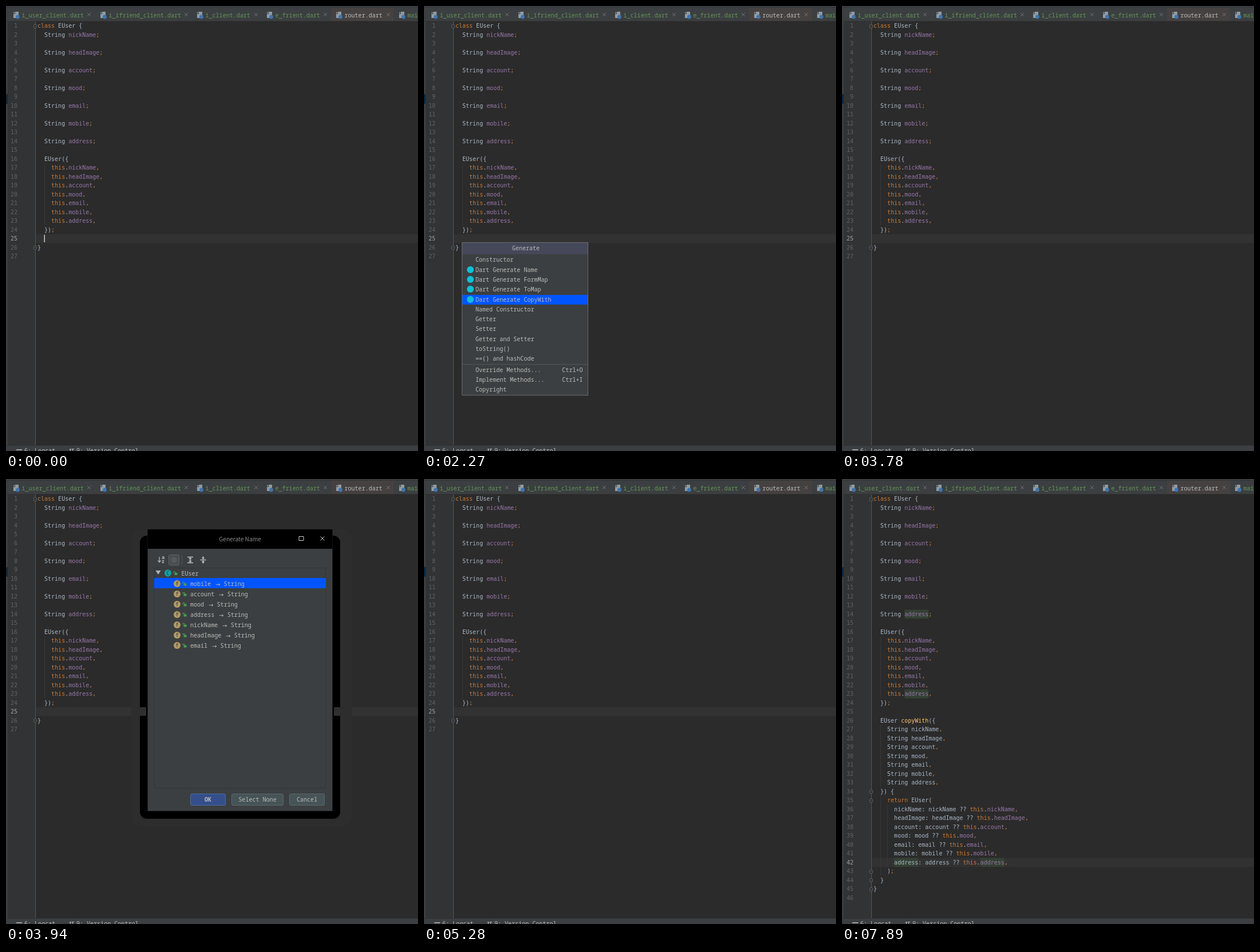
Recreate the animation shown at these times as an HTML page with a canvas. Size 720 by 778 pixels, loop 8200 ms.

```html
<!DOCTYPE html>
<html lang="en">
<head>
<meta charset="utf-8">
<title>Generate copyWith</title>
<style>
html, body { margin: 0; width: 100%; height: 100%; overflow: hidden; background: #2b2b2b; }
canvas { display: block; }
</style>
</head>
<body>
<canvas id="stage" width="720" height="778"></canvas>
<script>
const ctx = document.getElementById('stage').getContext('2d');
const LOOP = 8200, ROW = 15.5, CHAR = 6.02, LEFT = 55;
const TEXT = '#a9b7c6', ORANGE = '#cc7832', PURPLE = '#9876aa', YELLOW = '#ffc66d';
const PANEL = '#3c3f41', UI = '#bbbbbb', BLUE = '#0055ff';
const CODE_FONT = '10px "DejaVu Sans Mono", monospace';
const UI_FONT = '10.05px "Noto Sans Mono", monospace';

const fields = ['nickName', 'headImage', 'account', 'mood', 'email', 'mobile', 'address'];
const head = [
  'class EUser {',
  ...fields.flatMap(f => [`  String ${f};`, '']),
  '  EUser({',
  ...fields.map(f => `    this.${f},`),
  '  });', ''
];
const before = [...head, '}', ''];
const after = [
  ...head,
  '  EUser copyWith({',
  ...fields.map(f => `    String ${f},`),
  '  }) {',
  '    return EUser(',
  ...fields.map(f => `      ${f}: ${f} ?? this.${f},`),
  '    );', '  }', '}', ''
];

const menu = ['Constructor', 'Dart Generate Name', 'Dart Generate FormMap', 'Dart Generate ToMap',
  'Dart Generate CopyWith', 'Named Constructor', 'Getter', 'Setter', 'Getter and Setter',
  'toString()', '==() and hashCode', 'Override Methods...', 'Implement Methods...', 'Copyright'];
const shortcuts = { 11: 'Ctrl+O', 12: 'Ctrl+I' };
const members = ['mobile', 'account', 'mood', 'address', 'nickName', 'headImage', 'email'];
const tabs = [[12, 'i_user_client.dart', 145], [164, 'i_ifriend_client.dart', 315],
  [333, 'i_client.dart', 437], [455, 'e_frient.dart', 558], [576, 'router.dart', 668], [686, 'main.dart']];

function rect(x, y, w, h, color) {
  ctx.fillStyle = color;
  ctx.fillRect(x, y, w, h);
}

function round(x, y, w, h, r, fill, stroke) {
  ctx.beginPath();
  ctx.roundRect(x, y, w, h, r);
  if (fill) { ctx.fillStyle = fill; ctx.fill(); }
  if (stroke) { ctx.strokeStyle = stroke; ctx.lineWidth = 1; ctx.stroke(); }
}

function text(str, x, y, color = UI, font = UI_FONT, align = 'left') {
  ctx.font = font;
  ctx.fillStyle = color;
  ctx.textAlign = align;
  ctx.fillText(str, x, y);
}

function disc(x, y, r, color) {
  ctx.beginPath();
  ctx.arc(x, y, r, 0, 7);
  ctx.fillStyle = color;
  ctx.fill();
}

function path(d, color, width = 1, fill = false) {
  const p = new Path2D(d);
  ctx.strokeStyle = ctx.fillStyle = color;
  ctx.lineWidth = width;
  if (fill) ctx.fill(p); else ctx.stroke(p);
}

const cross = (x, y, r, color) =>
  path(`M${x - r} ${y - r}l${2 * r} ${2 * r}M${x + r} ${y - r}l${-2 * r} ${2 * r}`, color);
const lineTop = n => 27 + ROW * (n - 1);

function drawChrome() {
  rect(0, 0, 720, 27, PANEL);
  rect(0, 2, 720, 1, '#323537');
  rect(568, 3, 110, 23, '#464141');
  rect(0, 26, 720, 1, '#323232');
  rect(0, 27, 3, 741, PANEL);
  rect(0, 154, 3, 17, '#0d293e');
  for (const [x, name, closeX] of tabs) {
    path(`M${x + 4} 10h6v11h-9v-7h3z`, '#8f9ba3', 1, true);
    path(`M${x + 1} 13v-1l2-2v3z`, '#8f9ba3', 1, true);
    disc(x + 8.5, 19, 3.4, '#3f74b0');
    text(name, x + 15.5, 19.5, name === 'router.dart' ? UI : '#629755');
    if (closeX) cross(closeX, 15, 3, '#6e7173');
  }
  rect(0, 768, 720, 10, PANEL);
  rect(0, 768, 720, 1, '#323537');
  rect(18, 775, 10, 1.5, UI);
  text('6: Logcat', 32, 781);
  path('M112.5 778v-4M110.5 776l2-2 2 2M116.5 774v4M115 774.5h4', UI);
  text('9: Version Control', 123, 781);
}

function foldMark(n) {
  const y = Math.round(lineTop(n) + 4.5) + .5;
  round(48.5, y, 5, 6, 1, '#2b2b2b', '#606366');
  rect(50, y + 2.5, 2, 1, '#606366');
}

function guide(col, first, last) {
  rect(Math.round(LEFT + col * CHAR), lineTop(first), 1, (last - first + 1) * ROW, '#373737');
}

function drawLine(line, n, semantic) {
  const y = Math.round(lineTop(n) + 11.3);
  const token = /(class|return|this|[,;])|((?<=this\.|^  String )\w+)|(copyWith)|[^\s,;.]+|\./g;
  for (const m of line.matchAll(token)) {
    const known = semantic || n < 26;
    const color = m[1] ? ORANGE : known && m[2] ? PURPLE : known && m[3] ? YELLOW : TEXT;
    text(m[0], LEFT + m.index * CHAR, y, color, CODE_FONT);
  }
}

function drawEditor(t) {
  const inserted = t >= 5330;
  const lines = inserted ? after : before;
  const current = t >= 6210 ? 42 : 25;
  rect(3, 27, 49, 741, '#313335');
  rect(52, lineTop(current), 668, ROW, '#323232');
  rect(51, 27, 1, 741, '#555555');

  if (t >= 6260) {
    for (const [n, col] of [[14, 9], [23, 9], [42, 6], [42, 31]])
      rect(LEFT + col * CHAR, lineTop(n), 7 * CHAR, ROW, '#344134');
  }
  guide(2, 17, 23);
  if (inserted) {
    guide(2, 27, 33);
    guide(2, 35, 43);
    guide(4, 36, 42);
  }
  lines.forEach((line, i) => {
    const n = i + 1;
    text(n, 20, Math.round(lineTop(n) + 11.3), n === current ? '#a4a3a3' : '#606366', CODE_FONT, 'right');
    drawLine(line, n, t >= 5900);
  });
  [1, lines.length - 1, ...(t >= 5620 ? [34, 35, 43, 44] : [])].forEach(foldMark);

  if (t < 50 || t >= 540 && t < 1470) rect(66.5, 400, 1.5, 13, '#cccccc');
  if (t >= 6210 && t < 6910 || t >= 7390 && t < 7890) rect(90.5, 663, 1.5, 14, '#cccccc');
}

// Brief ring around the pointer.
function drawRipple(t) {
  const p = (t - 740) / 290;
  if (p < 0 || p >= 1) return;
  ctx.beginPath();
  ctx.arc(125, 412, 3 + 7 * p, 0, 7);
  ctx.strokeStyle = `rgba(187,187,187,${.5 * (1 - p)})`;
  ctx.lineWidth = 1;
  ctx.stroke();
}

function drawMenu(selected) {
  round(66.5, 413.5, 220, 267, 0, PANEL, '#6a6d70');
  rect(67, 414, 219, 20, '#454859');
  text('Generate', 178, 427, UI, UI_FONT, 'center');
  rect(67, 626, 219, 1, '#54575a');
  menu.forEach((label, i) => {
    const top = Math.round(435.3 + 17.3 * i + (i > 10 ? 2 : 0));
    if (i === selected) rect(67, top, 219, 17, BLUE);
    if (i > 0 && i < 5) disc(81, top + 8, 6, '#12bfd6');
    text(label, 90, top + 11.5);
    if (shortcuts[i]) text(shortcuts[i], 277.5, top + 12, UI, UI_FONT, 'right');
  });
}

function badge(x, y, letter, color) {
  disc(x, y, 6, color);
  text(letter, x, y + 3, '#2f3436', '9px "DejaVu Sans Mono", monospace', 'center');
  const lockX = x + 10;
  path(`M${lockX} ${y}v-2.5h3v2.5`, '#499c54');
  rect(lockX + 1.5, y - .5, 5, 4, '#499c54');
}

function button(x, w, label, fill, stroke, font = UI_FONT) {
  round(x + .5, 550.5, w - 1, 20, 2, fill, stroke);
  text(label, x + w / 2, 563.5, UI, font, 'center');
}

function drawDialog(t) {
  round(219, 88, 386, 520, 20, '#2d2d2d');
  round(234, 99, 350, 495, 12, '#000');
  rect(234, 399, 11, 15, '#2f2f2f');
  rect(573, 399, 11, 15, '#2f2f2f');
  rect(247.5, 88, 323, 492.5, PANEL);
  rect(247.5, 88, 323, 34, '#000');
  text('Generate Name', 409, 109, '#8c8c8c', '10.2px "Noto Sans CJK SC", "Noto Sans", sans-serif', 'center');
  path('M512 100.5h8v7h-8z', '#d0d0d0');
  cross(553, 104, 3.5, '#d0d0d0');
  if (t < 3940) return;

  path('M268 136v9M265.5 142.5l2.5 3 2.5-3', '#afb1b3', 1.3);
  text('a', 272, 140, '#afb1b3', 'bold 8px "DejaVu Sans", sans-serif');
  text('z', 272, 147, '#afb1b3', 'bold 8px "DejaVu Sans", sans-serif');
  round(284.5, 132.5, 18, 18, 2, '#4a4d4f', '#606365');
  disc(293.5, 141.5, 5, '#525b63');
  rect(307, 133, 1, 17, '#555759');
  path('M317 136.5h10M317 146.5h10M322 138v7M320 140l2-2 2 2M320 143l2 2 2-2', '#c0c2c4', 1.3);
  path('M339.5 141.5h10M344.5 135v4M342.5 137.5l2 2 2-2M344.5 148v-4M342.5 145.5l2-2 2 2', '#c0c2c4', 1.3);

  round(259.5, 155.5, 299, 385, 0, PANEL, '#323537');
  if (t >= 4910) rect(259, 155, 300, 145, BLUE);
  else rect(259, 173, 300, 18, BLUE);
  path('M261.5 160h9l-4.5 7z', '#b0b2b4', 1, true);
  badge(283, 164.5, 'C', '#0fa3a5');
  text('EUser', 306.5, 168.5);
  members.forEach((name, i) => {
    const y = 183 + 18 * i;
    const nameEnd = 322 + name.length * CHAR;
    badge(299, y, 'f', '#b29a63');
    text(name, 322, y + 3.5);
    text('→', nameEnd + 12, y + 4.5, UI, '10px "DejaVu Sans", sans-serif', 'center');
    text('String', nameEnd + 22.5, y + 3.5);
  });

  button(322, 62, 'OK', '#344f8b', '#4b6da0', 'bold ' + UI_FONT);
  button(394, 91, 'Select None', '#465457', '#5b686b');
  button(495, 62, 'Cancel', '#465457', '#5b686b');
}

// Start time and selected entry of each menu step.
const menuSteps = [[1520, 0], [1920, 1], [2170, 2], [2270, 4], [2780, 3], [3400, 4]];

function draw(t) {
  rect(0, 0, 720, 778, '#2b2b2b');
  drawEditor(t);
  drawChrome();
  drawRipple(t);
  if (t >= 1520 && t < 3780) drawMenu(menuSteps.filter(([start]) => t >= start).pop()[1]);
  if (t >= 3900 && t < 5280) drawDialog(t);
}

const start = performance.now();
function frame() {
  draw((performance.now() - start) % LOOP);
  requestAnimationFrame(frame);
}
frame();
</script>
</body>
</html>
```
